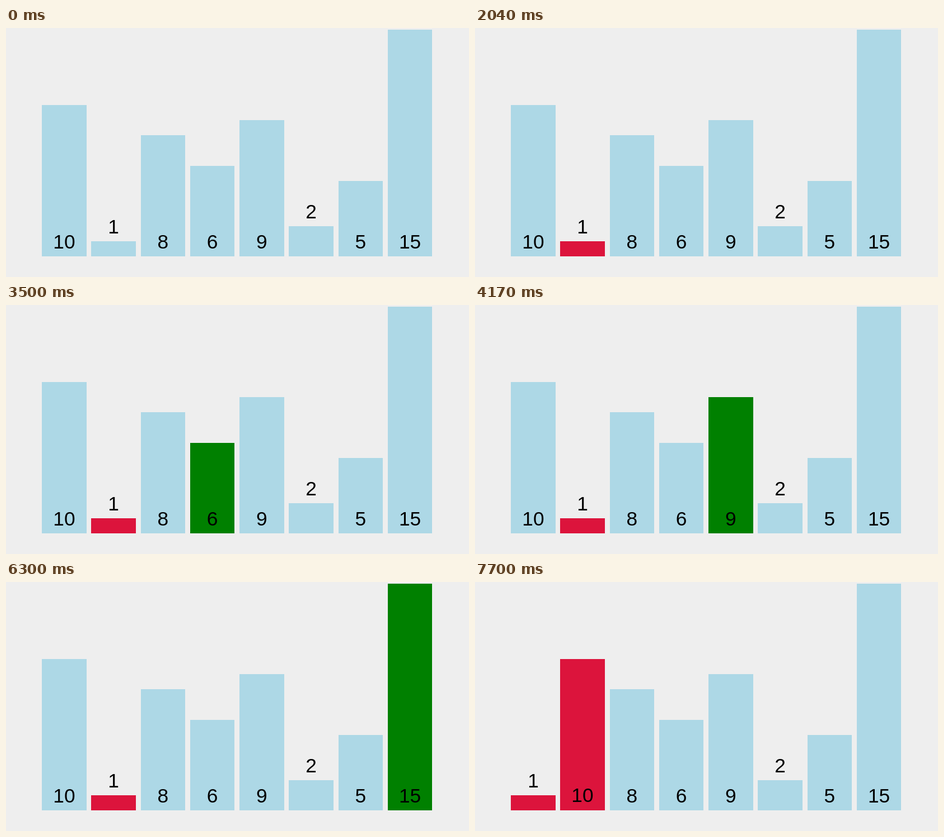
An HTML page for the animation above (8000 ms loop, 827 by 446 pixels).

```html
<!DOCTYPE html>
<html lang="en">
<head>
<meta charset="utf-8">
<title>Selection sort</title>
<style>
  html, body { margin: 0; width: 100%; height: 100%; overflow: hidden; background: #eee; }
  svg { display: block; }
  rect { shape-rendering: crispEdges; }
  text { font: 35.3px "Liberation Sans", Arial, sans-serif; text-anchor: middle; }
</style>
</head>
<body>
<svg width="827" height="446" viewBox="0 0 827 446"></svg>
<script>
const LOOP = 8000, FADE = 240;
const LEFT = 64.2, STEP = 88.24, WIDTH = 79.4, BASE = 409, UNIT = 27.07;
const BLUE = [173, 216, 230], RED = [220, 20, 60], GREEN = [0, 128, 0];
const values = [10, 1, 8, 6, 9, 2, 5, 15];

// Each step: start time, then the bars that change colour
const steps = [
  [405, { 0: RED }],
  [1135, { 1: GREEN }],
  [1805, { 0: BLUE, 1: RED }],
  [2535, { 2: GREEN }],
  [3265, { 2: BLUE, 3: GREEN }],
  [3935, { 3: BLUE, 4: GREEN }],
  [4665, { 4: BLUE, 5: GREEN }],
  [5335, { 5: BLUE, 6: GREEN }],
  [6065, { 6: BLUE, 7: GREEN }],
  [6735, { 7: BLUE, 0: RED }]
];
const SWAP = 7465;

const svg = document.querySelector("svg");
function add(parent, tag, attrs = {}) {
  const el = document.createElementNS("http://www.w3.org/2000/svg", tag);
  for (const key in attrs) el.setAttribute(key, attrs[key]);
  return parent.appendChild(el);
}

const bars = values.map((value, i) => {
  const group = add(svg, "g");
  const x = Math.round(LEFT + i * STEP), right = Math.round(LEFT + i * STEP + WIDTH);
  const top = Math.round(BASE - value * UNIT);
  const rect = add(group, "rect", { x, y: top, width: right - x, height: BASE - top });
  const y = value < 3 ? top - 14 : BASE - 14;
  const label = add(group, "text", { x: LEFT + i * STEP + WIDTH / 2, y });
  label.textContent = value;
  return { group, rect, label };
});

function ease(time, start) {
  const p = Math.min(1, Math.max(0, (time - start) / FADE));
  return p < 0.5 ? 4 * p ** 3 : 1 - 4 * (1 - p) ** 3;
}

function draw(time) {
  const colors = values.map(() => BLUE);
  for (const [start, changes] of steps) {
    const p = ease(time, start);
    for (const i in changes) {
      colors[i] = colors[i].map((c, k) => c + (changes[i][k] - c) * p);
    }
  }
  bars.forEach((bar, i) => bar.rect.setAttribute("fill", `rgb(${colors[i].map(Math.round)})`));

  const p = ease(time, SWAP);
  bars[0].group.setAttribute("transform", `translate(${p * 88} 0)`);
  bars[1].group.setAttribute("transform", `translate(${-p * 88} 0)`);
  bars[0].label.setAttribute("y", BASE - 14 - p);
}

const begin = performance.now();
function tick() {
  draw((performance.now() - begin) % LOOP);
  requestAnimationFrame(tick);
}
tick();
</script>
</body>
</html>
```
